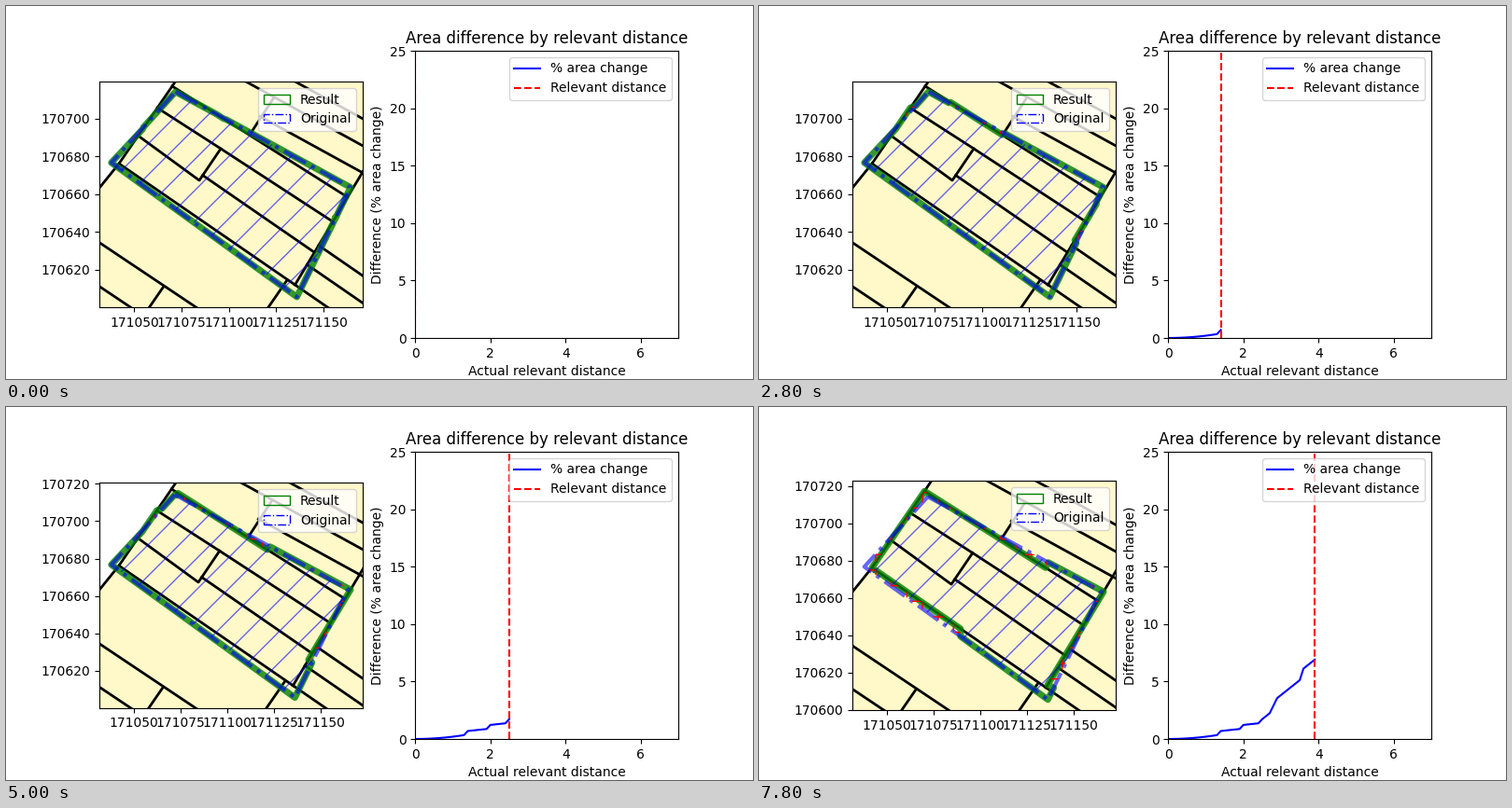
A matplotlib script for the animation above (8000 ms loop, 800 px wide and 400 px high).

```python
import numpy as np
import matplotlib.pyplot as plt
from matplotlib.animation import FuncAnimation
from matplotlib.patches import Patch, PathPatch, Polygon
from matplotlib.path import Path
from matplotlib.ticker import MultipleLocator

FRAMES, STEP_MS = 40, 200
SCALE = 2.0244  # plan units per metre

# Corners of the input polygon, in plan units with y down
TOP, RIGHT, BOTTOM, LEFT = (181.5, 92), (369, 194.5), (311.5, 312), (112.8, 168)
# Corners of the block of parcels it snaps to
P_TOP, P_RIGHT, P_BOTTOM, P_LEFT = (178, 86), (365.8, 205), (309.5, 299), (121, 169)

# Distances at which a corner or vertex comes into reach
VERTEX, EAST, NEAR_TOP, NORTH, WEST, SOUTH = 1.4, 2.0, 2.5, 2.8, 2.9, 3.6


def to_map(points):
    """Convert plan coordinates to map metres."""
    p = np.asarray(points, float)
    return np.column_stack([171031.55 + (p[:, 0] - 100) / SCALE,
                            170600.1 + (323.05 - p[:, 1]) / SCALE])


def mix(a, b, t):
    return a[0] + (b[0] - a[0]) * t, a[1] + (b[1] - a[1]) * t


def at_x(a, b, x):
    """Point of line ab with the given x."""
    return mix(a, b, (x - a[0]) / (b[0] - a[0]))


def at_y(a, b, y):
    """Point of line ab with the given y."""
    return mix(a, b, (y - a[1]) / (b[1] - a[1]))


def ray(start, slope, x):
    return [start, (x, start[1] + slope * (x - start[0]))]


def parcel_lines():
    west, east = 90, 395
    fork, gap = (207, 187), (230, 153)
    # block outline, running on past its corners
    yield [(92, 205), P_LEFT, P_TOP, (186, 74)]
    yield [P_TOP, P_RIGHT]
    yield [at_y(P_RIGHT, P_BOTTOM, 165), P_BOTTOM]
    yield [P_LEFT, P_BOTTOM]
    # plots inside the block
    yield [mix(P_TOP, P_LEFT, 0.28), gap, mix(P_RIGHT, P_BOTTOM, 0.28)]
    yield [mix(P_TOP, P_LEFT, 0.64), fork, gap]
    yield [mix(fork, gap, 0.16), mix(P_RIGHT, P_BOTTOM, 0.63)]
    # plots to the east
    for t in (0.55, 0.77, 1):
        yield ray(mix(P_RIGHT, P_BOTTOM, t), 0.69, east)
    # plots to the north
    for k, x in enumerate((297, 246, 272)):
        yield ray((x, 128 + 29 * k - 0.55 * (east - x)), 0.55, east)
    yield [(287, 98), (263, 135)]
    # plots to the south
    for y in (254, 301):
        yield ray((west, y - 7), 0.67, 220)
    for x, y in ((168, 302), (301, 294)):
        yield [(x, y), (x - 20, y + 29)]


def aligned(d):
    """Outline after snapping to the parcels within distance d."""
    d = round(d, 1)

    # top edge: the snapped stretch grows from where both lines cross
    if d >= NORTH:
        pts = [P_TOP]
    else:
        x = 185 if d >= NEAR_TOP else 228 - 16.3 * d
        pts = [TOP, at_x(TOP, RIGHT, x - 2), at_x(P_TOP, P_RIGHT, x)]
    x = 233 + 19.5 * d
    pts += [at_x(P_TOP, P_RIGHT, x), at_x(TOP, RIGHT, x + 3)]

    # right edge
    if d >= EAST:
        pts += [at_y(P_RIGHT, P_BOTTOM, 195)]
    else:
        y = 226 - 11 * d
        pts += [RIGHT, at_y(RIGHT, BOTTOM, y), at_y(P_RIGHT, P_BOTTOM, y + 2)]
    y = 226 + 18 * d
    pts += [at_y(P_RIGHT, P_BOTTOM, y), at_y(RIGHT, BOTTOM, y + 3), BOTTOM]

    # bottom edge, then up the left one
    if d >= WEST:
        x = 217 - 72 * (3.9 - d)
        pts += [at_x(LEFT, BOTTOM, x), at_x(P_LEFT, P_BOTTOM, x), P_LEFT]
    else:
        pts += [LEFT, at_y(P_TOP, P_LEFT, 132)]
    if d < NORTH:
        y = 109 if d >= VERTEX else 132 - 13 * d
        pts += [at_y(P_TOP, P_LEFT, y), at_y(TOP, LEFT, y - 2)]
    return to_map(pts)


def area_change(d):
    """Slow growth, then a steep one, with a jump at every new vertex."""
    d = np.round(d, 1)
    grow = (0.2 * np.minimum(d, 1.3) ** 2 + 0.35 * np.clip(d - 1.3, 0, 1.2)
            + 2.6 * np.maximum(d - 2.5, 0))
    small = sum(0.32 * (d >= s) for s in (VERTEX, EAST, NEAR_TOP))
    large = 0.4 * (d >= NORTH) + 0.4 * (d >= WEST) + 0.75 * (d >= SOUTH)
    return grow + small + large


dist = np.arange(FRAMES) / 10
area = area_change(dist)

fig, (map_ax, ax) = plt.subplots(1, 2, figsize=(8, 4), dpi=100)

# Map
map_ax.set_aspect("equal")
map_ax.xaxis.set_major_locator(MultipleLocator(25))
map_ax.yaxis.set_major_locator(MultipleLocator(20))
map_ax.ticklabel_format(useOffset=False, style="plain")

lines = list(parcel_lines())
land = lines[0] + [(420, 74), (420, 340), (92, 340)]
map_ax.add_patch(Polygon(to_map(land), fc="#FFF8C9", ec="none", zorder=1))
for line in lines:
    map_ax.plot(*to_map(line).T, color="black", lw=2, zorder=1.2,
                solid_joinstyle="round")

outline = to_map([TOP, RIGHT, BOTTOM, LEFT])
result = Polygon(outline, fc="none", ec="green", lw=5, alpha=0.8,
                 joinstyle="round", zorder=1.4)
initial = Polygon(outline, fc="none", ec="blue", lw=3, ls="-.", alpha=0.6,
                  hatch="/", joinstyle="round", zorder=1.6)
diff = PathPatch(Path(outline), fc="none", ec="red", lw=0, hatch="+", zorder=1.8)
for patch in (result, initial, diff):
    map_ax.add_patch(patch)
map_ax.legend(handles=[Patch(fc="none", ec="green", label="Result"),
                       Patch(fc="none", ec="blue", ls="-.", label="Original")],
              loc="upper right")

# Chart
ax.set(xlim=(0, 7), ylim=(0, 25), xlabel="Actual relevant distance",
       ylabel="Difference (% area change)",
       title="Area difference by relevant distance")
curve, = ax.plot([], [], color="blue", label="% area change")
marker = ax.axvline(0, color="red", ls="--", label="Relevant distance")
ax.legend(loc="upper right")


def ring(points):
    return Path(np.vstack([points, points[:1]]), closed=True)


def update(i):
    shape = aligned(dist[i])
    result.set_xy(shape)
    # opposite windings leave only the area between both outlines
    diff.set_path(Path.make_compound_path(ring(outline), ring(shape[::-1])))

    both = np.vstack([outline, shape])
    low, high = both.min(axis=0), both.max(axis=0)
    pad = 0.05 * (high - low)
    map_ax.set_xlim(low[0] - pad[0], high[0] + pad[0])
    map_ax.set_ylim(low[1] - pad[1], high[1] + pad[1])

    curve.set_data(dist[:i + 1], area[:i + 1])
    marker.set_xdata([dist[i], dist[i]])
    return curve, marker, result, diff


anim = FuncAnimation(fig, update, frames=FRAMES, interval=STEP_MS,
                     repeat=True, repeat_delay=0)
plt.show()
```
